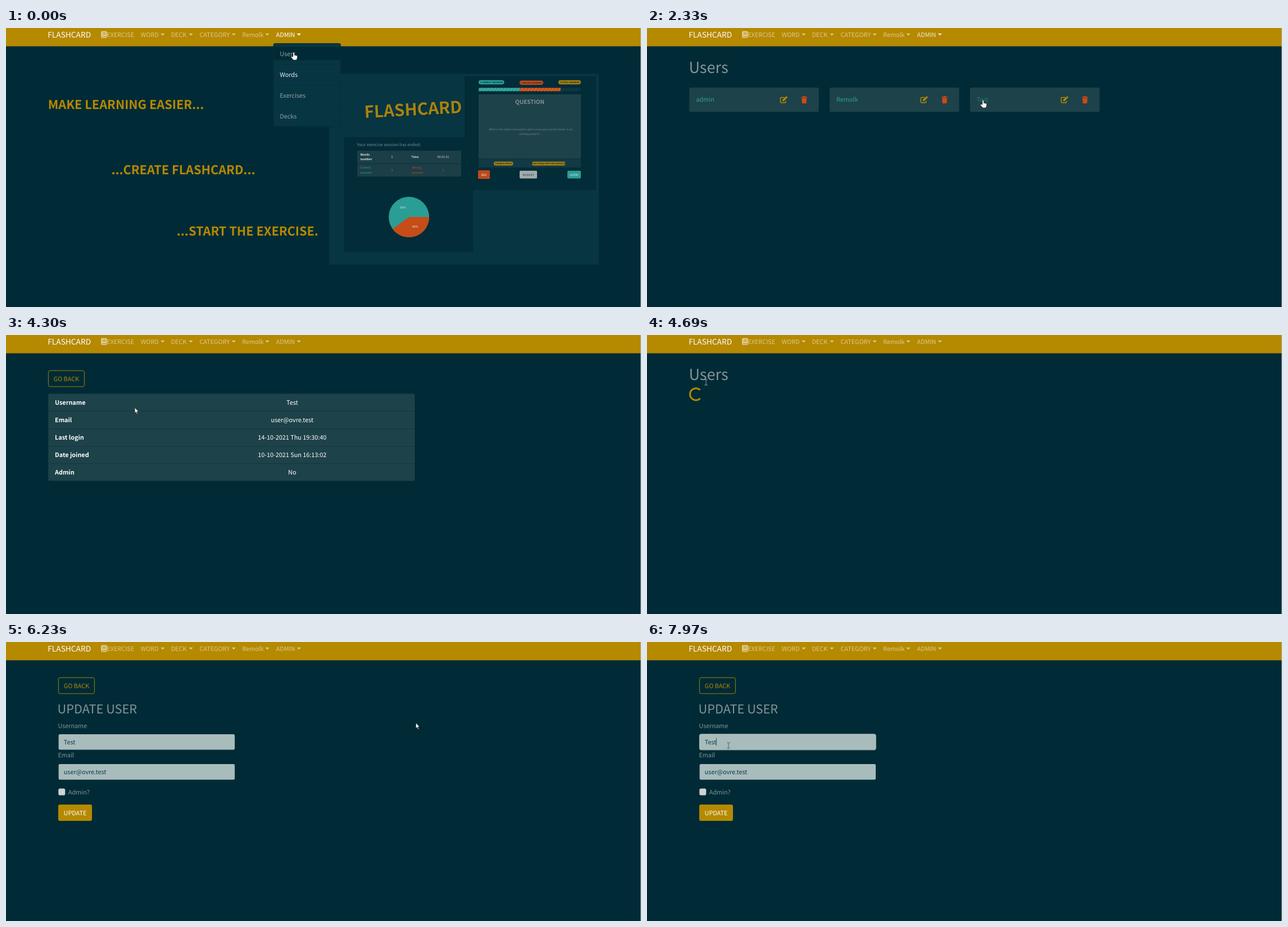
An HTML page for the animation above (8 s loop, 1130 by 496 pixels).

```html
<!DOCTYPE html>
<html lang="en">
<head>
<meta charset="utf-8">
<title>Flashcard admin</title>
<style>
html, body { margin: 0; width: 100%; height: 100%; overflow: hidden; background: #002b36; }
svg { display: block; width: 100vw; height: 100vh; }
text {
  font-family: "Noto Sans CJK JP", "Noto Sans CJK SC", "Noto Sans CJK", "Noto Sans", sans-serif;
  text-rendering: geometricPrecision;
  white-space: pre;
}
</style>
</head>
<body>
<svg id="stage" viewBox="0 0 1130 496" xmlns="http://www.w3.org/2000/svg"></svg>
<script>
const LOOP = 8000;
const BG = '#002b36', PANEL = '#073642', CARD = '#1e424a';
const GOLD = '#b58900', TEAL = '#2aa198', RED = '#cb4b16', GREY = '#839496';
const NAV = 'rgba(255,255,255,.55)';
const BODY = 10.84, H2 = 21.7, H1 = 27.1;
const MEMBER = 'Remolk', MAIL = 'user@ovre.test';

const stage = document.getElementById('stage');

function el(parent, tag, attrs = {}) {
  const node = document.createElementNS('http://www.w3.org/2000/svg', tag);
  for (const key in attrs) node.setAttribute(key, attrs[key]);
  parent.appendChild(node);
  return node;
}
const group = (parent, attrs) => el(parent, 'g', attrs);
const path = (parent, d, attrs) => el(parent, 'path', { d, ...attrs });

function box(parent, x, y, right, bottom, fill, rx = 0, attrs = {}) {
  return el(parent, 'rect', { x, y, width: right - x, height: bottom - y, rx, fill, ...attrs });
}
function label(parent, str, x, y, fill, size = BODY, attrs = {}) {
  const node = el(parent, 'text', { x, y, fill, 'font-size': size, ...attrs });
  node.textContent = str;
  return node;
}
const MID = { 'text-anchor': 'middle' };
const BOLD = { 'font-weight': 700 };
const MIDBOLD = { ...MID, ...BOLD };

function show(node, on) {
  node.style.display = on ? '' : 'none';
}

// Navigation bar
const nav = group(stage);
box(nav, 0, 0, 1130, 32.5, GOLD);
label(nav, 'FLASHCARD', 74.2, 17, '#fff', 13.75);
const book = group(nav, { transform: 'translate(169 5.6)' });
box(book, 0, 0, 10.8, 12.2, '#dec98c', 1.8);
path(book, 'M3 3.2H8.4M3 5.4H8.4M1.6 9.9H10.8', { stroke: GOLD, 'stroke-width': 0.9 });
label(nav, 'EXERCISE', 179.4, 16, NAV);

function menu(name, x, caretX) {
  const g = group(nav, { fill: NAV });
  label(g, name, x, 16, 'inherit').removeAttribute('fill');
  path(g, `M${caretX} 9.8h7.3l-3.65 3.6z`);
  return g;
}
menu('WORD', 239.8, 275.2);
menu('DECK', 293.4, 325.4);
menu('CATEGORY', 344.4, 401.6);
menu(MEMBER, 420.2, 461.4);
const admin = menu('ADMIN', 480.6, 517.6);

// Home page
const home = group(stage);
label(home, 'MAKE LEARNING EASIER...', 213.5, 143.8, GOLD, H2, MIDBOLD);
label(home, '...CREATE FLASHCARD...', 315.5, 259.6, GOLD, H2, MIDBOLD);
label(home, '...START THE EXERCISE.', 429.8, 368.8, GOLD, H2, MIDBOLD);
box(home, 575, 81.5, 1055, 420.5, PANEL, 3);
box(home, 601, 194, 831.5, 398, '#022c37');
box(home, 816, 86, 1050, 288, '#022c37');

const logo = group(home, { transform: 'translate(724.5 144.5) rotate(-3)' });
label(logo, 'FLASHCARD', 1.2, 12.2, '#052530', 29.6, MIDBOLD);
label(logo, 'FLASHCARD', 0, 11, '#a88212', 29.6, MIDBOLD);

function summary() {
  const tiny = 5.4;
  label(home, 'Your exercise session has ended.', 624.4, 209.8, '#74888b', 7.6);
  box(home, 625, 218, 810, 264, '#1c3e47');
  box(home, 625, 240.6, 810, 241.6, '#0a303b');
  label(home, 'Words', 630.5, 227, '#dfe5e5', tiny, BOLD);
  label(home, 'number', 630.5, 235, '#dfe5e5', tiny, BOLD);
  label(home, '5', 687, 231.2, '#d0d8d8', tiny, MID);
  label(home, 'Time', 728, 231.2, '#dfe5e5', tiny, MIDBOLD);
  label(home, '00:01:01', 778, 231.2, '#d0d8d8', tiny, MID);
  label(home, 'Correct', 630.5, 250.4, TEAL, tiny);
  label(home, 'answers', 630.5, 259, TEAL, tiny);
  label(home, '3', 687, 255, TEAL, tiny, MID);
  label(home, 'Wrong', 731, 250.4, RED, tiny, MID);
  label(home, 'answers', 732, 259, RED, tiny, MID);
  label(home, '2', 778, 255, RED, tiny, MID);

  const r = 36, a = 0.8 * Math.PI;
  el(home, 'circle', { cx: 717, cy: 336, r, fill: '#2a9d95' });
  path(home, `M717 336h${r}A${r} ${r} 0 0 1 ${717 + r * Math.cos(a)} ${336 + r * Math.sin(a)}z`, { fill: '#c64c18' });
  label(home, '60%', 706.5, 321.4, '#e6eeee', tiny, MID);
  label(home, '40%', 728, 355.2, '#e6eeee', tiny, MID);
}
summary();

function pill(str, x, y, right, bottom, fill, size) {
  box(home, x, y, right, bottom, fill, (bottom - y) / 2);
  label(home, str, (x + right) / 2, (y + bottom) / 2 + size * 0.36, '#0b2f3a', size, MIDBOLD);
}
function stripes(x, right, fill, line) {
  box(home, x, 106.5, right, 112.3, fill);
  for (let s = x + 1; s < right - 5; s += 6) path(home, `M${s} 112.3l4-5.8h2.4l-4 5.8z`, { fill: line });
}
function button(str, x, y, right, bottom, fill, color) {
  box(home, x, y, right, bottom, fill, 1.6);
  label(home, str, (x + right) / 2, (y + bottom) / 2 + 2, color, 5.2, MID);
}
function quiz() {
  pill('3 CORRECT ANSWERS', 841, 92.8, 886.5, 100.2, TEAL, 3.9);
  pill('2 WRONG ANSWERS', 914, 93.5, 956, 101, RED, 3.9);
  pill('5 TOTAL ANSWERS', 983, 92.8, 1023, 100.2, '#a58010', 3.9);
  stripes(841, 914, '#2a9d95', '#48aaa2');
  stripes(914, 987, '#c64c18', '#d2672f');
  stripes(987, 1023, '#0a3440', '#113a45');
  box(home, 841, 118, 1023, 248, CARD, 1);
  box(home, 841, 232.5, 1023, 248, '#123944');
  box(home, 841, 232, 1023, 233, '#082e39');
  label(home, 'QUESTION', 932, 134.6, '#839496', 10, MIDBOLD);
  label(home, "What is the shell command to start a new app named 'starts' in an", 934, 182, '#71878a', 4.9, MID);
  label(home, 'existing project?', 931.5, 190, '#71878a', 4.9, MID);
  pill('Category Name', 868, 237.6, 902.5, 244.4, '#a58010', 4);
  pill('Basic Setup Interview Question', 935.5, 237.6, 995.5, 244.4, '#a58010', 4);
  button('BAD', 840, 253, 861, 268.3, '#bd4a1a', '#efe3dc');
  button('00:00:47', 914, 253.8, 945, 267.4, '#a3abac', '#10323c');
  button('GOOD', 999, 253.8, 1023, 267.4, '#2a9d95', '#e2f0ee');
}
quiz();

const drop = group(home);
box(drop, 476, 27.5, 595.5, 175, PANEL, 3, { stroke: '#052d38', 'stroke-width': 1 });
box(drop, 476.5, 33.5, 595, 57.5, BG);
for (const y of [64, 101.2, 138.2]) box(drop, 476.5, y, 595, y + 0.9, '#052d38');
['Users', 'Words', 'Exercises', 'Decks'].forEach((name, i) => {
  label(drop, name, 487.2, 49.7 + i * 37.1, i === 1 ? '#e9eeee' : '#93a1a1');
});

// Users list
const users = group(stage);
label(users, 'Users', 74.4, 79.6, GREY, H1);
const spinner = path(users, 'M7.5 7.5A10.6 10.6 0 1 1 7.5 -7.5', { fill: 'none', stroke: GOLD, 'stroke-width': 3 });
const cards = group(users);

function userCard(name, x) {
  const g = group(cards, { transform: `translate(${x} 106)` });
  box(g, 0, 0, 230.5, 43, CARD, 2.5);
  const text = label(g, name, 12, 25.4, TEAL);
  const edit = group(g, { transform: 'translate(161.5 15)' });
  path(edit, 'M8 2.4H2.2Q.8 2.4 .8 3.8V10.4Q.8 11.8 2.2 11.8H8.8Q10.2 11.8 10.2 10.4V8.4',
    { fill: 'none', stroke: GOLD, 'stroke-width': 1.5 });
  path(edit, 'M4.2 9.2L4.5 6.6 9.6 1.5 11.9 3.8 6.8 8.9zM10.3 .8Q11.2 -.1 12.1 .7L13 1.6Q13.8 2.4 13 3.2L12.5 3.7 9.9 1.2z', { fill: GOLD });
  path(g, 'M199.3 16.2h3l.7-1.2h3l.7 1.2h3V17.8h-10.4zM200 18.6h9l-.6 8.3q-.1 1.1-1.2 1.1h-5.4q-1.1 0-1.2-1.1z', { fill: RED });
  return text;
}
userCard('admin', 75.2);
userCard(MEMBER, 325);
const testLink = userCard('Test', 574.8);

function goBack(parent, x) {
  box(parent, x + 0.4, 63.4, x + 64.4, 91.8, 'none', 3, { stroke: GOLD, 'stroke-width': 0.9 });
  label(parent, 'GO BACK', x + 32.4, 81.7, GOLD, BODY, MID);
}

// User details
const details = group(stage);
goBack(details, 75);
box(details, 75.2, 104.5, 727.5, 259.3, CARD, 3);
[['Username', 'Test'], ['Email', MAIL], ['Last login', '14-10-2021 Thu 19:30:40'],
 ['Date joined', '10-10-2021 Sun 16:13:02'], ['Admin', 'No']].forEach(([key, value], i) => {
  const y = 124 + i * 31.05;
  if (i) box(details, 75.2, y - 19.8, 727.5, y - 18.9, '#12353f');
  label(details, key, 87, y, '#fff', BODY, BOLD);
  label(details, value, 509.3, y, '#fff', BODY, MID);
});

// Update form
const form = group(stage);
goBack(form, 93);
label(form, 'UPDATE USER', 91.6, 127.2, GREY, H2);
label(form, 'Username', 92.4, 152.6, GREY);
const field = box(form, 93.6, 164, 407, 191.6, '#a8bcbc', 2.5);
const ring = box(form, 93.4, 163.8, 407.2, 191.8, 'none', 3, { stroke: '#c3cfca', 'stroke-width': 0.9 });
label(form, 'Test', 102.8, 181.8, '#0b3c47');
const caret = box(form, 123.2, 170.5, 124, 184.5, '#0b3c47');
label(form, 'Email', 92.4, 205.4, GREY);
box(form, 93.6, 217, 407, 244.8, '#a8bcbc', 2.5);
label(form, MAIL, 102.8, 234.9, '#0b3c47');
box(form, 93.3, 260.5, 105.3, 272.5, '#cdd4d4', 2.8);
label(form, 'Admin?', 110.8, 270.7, GREY);
box(form, 93, 289, 153, 318, GOLD, 3);
label(form, 'UPDATE', 123, 307.6, '#fff', BODY, MID);

box(stage, 1129.3, 0, 1130, 496, '#c4cccc');

// Pointer shapes, hot spot at the origin
const pointer = group(stage);
const OUTLINE = { fill: '#fff', stroke: '#10181b', 'stroke-width': 0.7, 'stroke-linejoin': 'round' };
const BEAM = 'M-2.8 -5H-.7L0 -4.4 .7 -5H2.8M0 -4.4V4.4M-2.8 5H-.7L0 4.4 .7 5H2.8';
const shapes = {
  arrow: path(pointer, 'M.4 0V10L2.6 7.9 4.1 11.6 5.7 10.9 4.2 7.3H7.2z', OUTLINE),
  hand: path(pointer, 'M-1.3 8V1.3a1.3 1.3 0 0 1 2.6 0V5.2l4 .8q1.5.4 1.4 1.8l-.8 4.2q-.3 2-2 2h-3.6q-1 0-1.7-1L-4.4 9.4q-.6-1 .3-1.6t1.6.2z', OUTLINE),
  beam: path(pointer, BEAM, { fill: 'none', stroke: '#a9b4b5', 'stroke-width': 0.9 }),
  ink: path(pointer, BEAM, { fill: 'none', stroke: '#47585b', 'stroke-width': 0.9 })
};

// time, x, y, shape from then on
const route = [
  [0, 512, 43, 'hand'], [180, 512, 43, 'arrow'], [760, 511, 43, 'arrow'],
  [940, 620, 90, 'arrow'], [1090, 686, 140, 'arrow'], [1240, 625, 150, 'arrow'],
  [1670, 625, 150, 'arrow'], [1900, 624, 180, 'arrow'], [2180, 604, 142, 'hand'],
  [2330, 598, 128, 'hand'], [2540, 598, 128, 'arrow'], [2830, 500, 212, 'arrow'],
  [3090, 437, 245, 'arrow'], [3240, 437, 245, 'arrow'], [3450, 518, 228, 'arrow'],
  [3760, 518, 228, 'arrow'], [3910, 492, 211, 'beam'], [4060, 492, 211, 'arrow'],
  [4250, 280, 146, 'arrow'], [4430, 118, 90, 'hand'], [4560, 105, 84, 'hand'],
  [4690, 105, 84, 'beam'], [4870, 105, 84, 'arrow'], [5080, 300, 145, 'arrow'],
  [5330, 600, 170, 'arrow'], [5560, 728, 144, 'arrow'], [5680, 731, 133, 'arrow'],
  [5740, 737, 129, 'arrow'], [5800, 741, 128, 'hand'], [5860, 742, 128, 'hand'],
  [6080, 742, 128, 'arrow'], [6180, 742, 128, 'arrow'], [6400, 590, 285, 'arrow'],
  [6540, 460, 331, 'arrow'], [6700, 286, 220, 'ink'], [6770, 243, 189, 'ink'],
  [6830, 226, 193, 'beam'], [6890, 226, 193, 'beam'], [7150, 196, 227, 'beam'],
  [7400, 130, 204, 'beam'], [7480, 129, 191, 'ink'], [7670, 145, 184, 'ink'],
  [8000, 145, 184, 'ink']
];

// Smooth path through the points, at rest around pauses
function slope(i, axis) {
  const a = route[i - 1], b = route[i], c = route[i + 1];
  if (!a || !c) return 0;
  const rests = p => p[1] === b[1] && p[2] === b[2];
  return rests(a) || rests(c) ? 0 : (c[axis] - a[axis]) / (c[0] - a[0]);
}
function along(i, axis, t) {
  const a = route[i], b = route[i + 1], span = b[0] - a[0];
  const u = (t - a[0]) / span, v = 1 - u;
  return v * v * (1 + 2 * u) * a[axis] + u * u * (3 - 2 * u) * b[axis]
    + span * u * v * (v * slope(i, axis) - u * slope(i + 1, axis));
}

function render(t) {
  const onHome = t < 180;
  const onDetails = t >= 2510 && t < 4690;
  const onForm = t >= 6110;
  const loading = t < 510 || (t >= 4690 && t < 5010);
  show(home, onHome);
  show(users, !onHome && !onDetails && !onForm);
  show(details, onDetails);
  show(form, onForm);
  show(cards, !loading);
  show(spinner, loading);
  admin.setAttribute('fill', onHome ? '#fff' : t < 2510 ? 'rgba(255,255,255,.8)' : NAV);

  const since = t - (t < 4690 ? 180 : 4690);
  spinner.setAttribute('transform', `translate(87.1 105.3) rotate(${since / 750 * 360})`);
  testLink.setAttribute('fill', t >= 2180 && t < 2510 ? '#1f7d77' : TEAL);

  const focus = Math.min(1, Math.max(0, (t - 7700) / 150));
  ring.setAttribute('opacity', focus);
  show(caret, t >= 7700);

  let i = route.length - 2;
  while (route[i][0] > t) i--;
  pointer.setAttribute('transform', `translate(${along(i, 1, t)} ${along(i, 2, t)})`);
  for (const name in shapes) show(shapes[name], name === route[i][3]);
}

let start;
function tick(now) {
  if (start === undefined) start = now;
  render((now - start) % LOOP);
  requestAnimationFrame(tick);
}
render(0);
requestAnimationFrame(tick);
</script>
</body>
</html>
```
